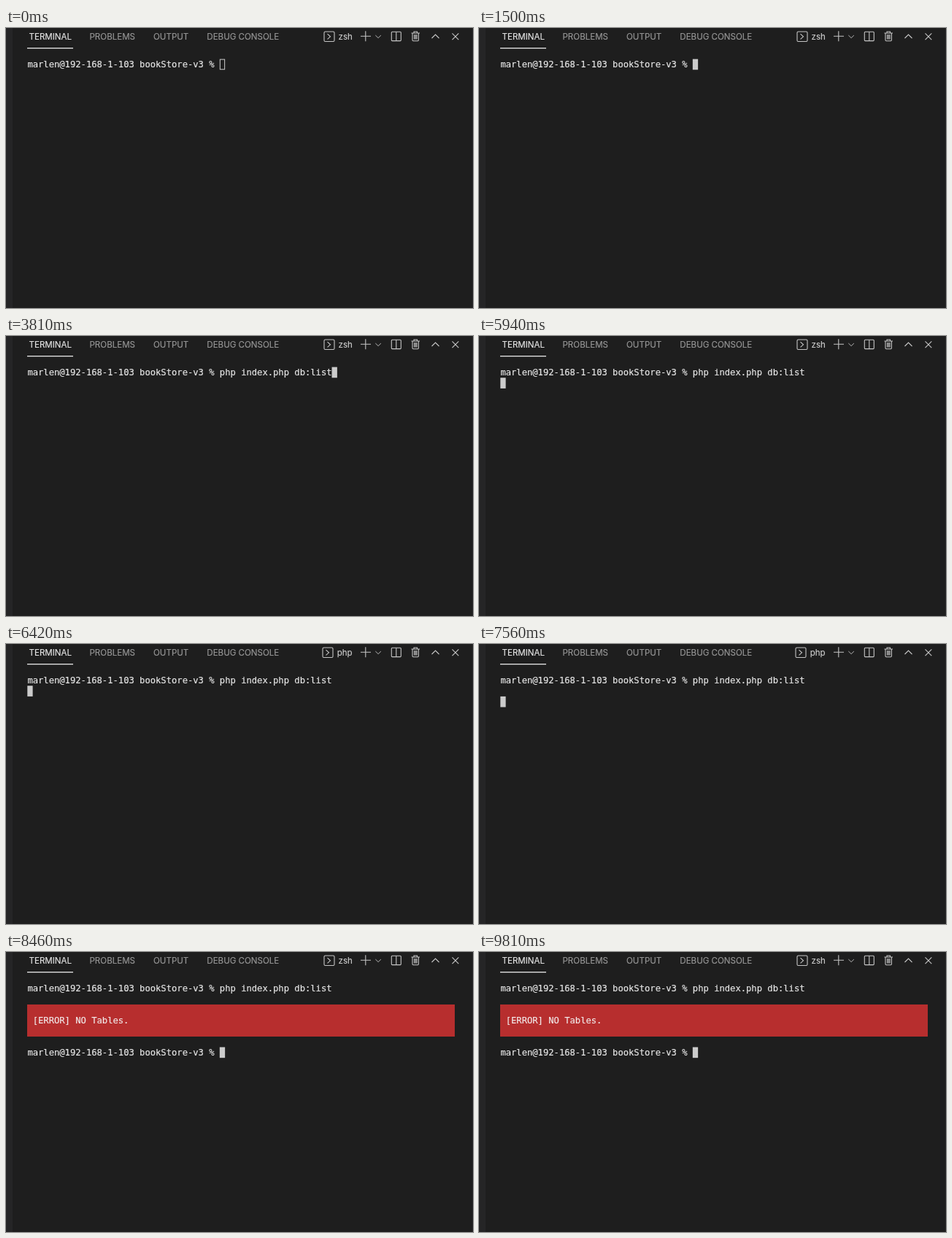
Animation of 640 by 384 pixels, one loop 9.87 s. Source, as an HTML page:

```html
<!DOCTYPE html>
<html lang="en">
<head>
<meta charset="utf-8">
<title>Terminal</title>
<style>
  html, body { margin: 0; width: 100%; height: 100%; overflow: hidden; background: #1e1e1e; }
  svg { display: block; }
  text { white-space: pre; }
  .ui { font: 11.55px Inter, sans-serif; fill: #979797; stroke: #979797; stroke-width: 0.15; }
  .ui .on { fill: #e7e7e7; stroke: #e7e7e7; }
  .ui .shell { fill: #cccccc; stroke: #cccccc; }
  .mono { font: 12.16px "DejaVu Sans Mono", monospace; fill: #e5e5e5; stroke: #e5e5e5; stroke-width: 0.2; }
  .icons { fill: none; stroke: #c5c5c5; stroke-width: 1.1; }
  .thin { stroke-width: 0.9; }
</style>
</head>
<body>
<svg width="640" height="384" viewBox="0 0 640 384">
  <rect width="9" height="384" fill="#252526"/>
  <rect x="639" width="1" height="384" fill="#252526"/>
  <g class="ui">
    <text class="on" x="31.5" y="15.8">TERMINAL</text>
    <text x="114.5" y="15.8">PROBLEMS</text>
    <text x="202" y="15.8">OUTPUT</text>
    <text x="275.3" y="15.8">DEBUG CONSOLE</text>
    <text class="shell" id="shell" y="15.8"></text>
  </g>
  <rect x="29" y="27" width="63" height="1.3" fill="#e7e7e7"/>
  <g class="icons">
    <g id="prompt">
      <rect x="436" y="5" width="14" height="13.5" rx="1.5"/>
      <path d="M440.5 8.2l4 3.6-4 3.6"/>
    </g>
    <path d="M486 11.3h14M492.8 4.3v14"/>
    <path class="thin" d="M506.3 10l3.800 3.600 3.800-3.600"/>
    <rect x="528.3" y="5.3" width="13" height="12.3" rx="1"/>
    <path d="M534.800 5.300v12.300"/>
    <path d="M555.500 7h11.500M559 7v-2h4.500v2M557 7v9.500q0 1.200 1.200 1.200h6q1.200 0 1.200-1.200v-9.500M559.600 9v6.500M561.300 9v6.500M563 9v6.500"/>
    <path d="M583.500 14l5-5 5 5"/>
    <path d="M611.500 7.300l8.800 8.800M620.300 7.300l-8.800 8.800"/>
  </g>
  <g class="mono">
    <text id="line" x="29.4" y="54"></text>
    <g id="result">
      <rect x="29" y="72" width="586" height="44" fill="#b72e2e" stroke="none"/>
      <text x="36.7" y="98" fill="#f5e6e6">[ERROR] NO Tables.</text>
      <text id="next" x="29.4" y="142"></text>
    </g>
  </g>
  <rect id="cursor"/>
</svg>
<script>
const LOOP = 9870, COL = 7.32, ROW = 14.65;
const PROMPT = 'marlen@192-168-1-103 bookStore-v3 % ';
const COMMAND = 'php index.php db:list';
const $ = id => document.getElementById(id);
const set = (el, attrs) => {
  for (const key in attrs) el.setAttribute(key, attrs[key]);
};

function draw(t) {
  const typed = t < 2760 ? 0 : t < 3420 ? 5 : COMMAND.length;
  const done = t >= 7620;
  const running = t >= 6090 && t < 7740;

  $('line').textContent = PROMPT + COMMAND.slice(0, typed);
  $('result').style.display = done ? '' : 'none';

  $('shell').textContent = running ? 'php' : 'zsh';
  set($('shell'), { x: running ? 453.7 : 455.5 });
  set($('prompt'), { transform: `translate(${running ? -2 : 0} 0)` });

  const row = done ? 6 : t >= 7560 ? 2 : t >= 5940 ? 1 : 0;
  const col = row === 0 ? PROMPT.length + typed : done ? PROMPT.length : 0;
  const hollow = t < 60;
  const inset = hollow ? 0.5 : 0;
  set($('cursor'), {
    x: 29.3 + col * COL + inset,
    y: 42.6 + row * ROW + inset,
    width: COL - 2 * inset,
    height: ROW - 2 * inset,
    fill: hollow ? 'none' : '#cccccc',
    stroke: hollow ? '#cccccc' : 'none'
  });
}

$('next').textContent = PROMPT;
const start = performance.now();
function tick() {
  draw((performance.now() - start) % LOOP);
  requestAnimationFrame(tick);
}
tick();
</script>
</body>
</html>
```
